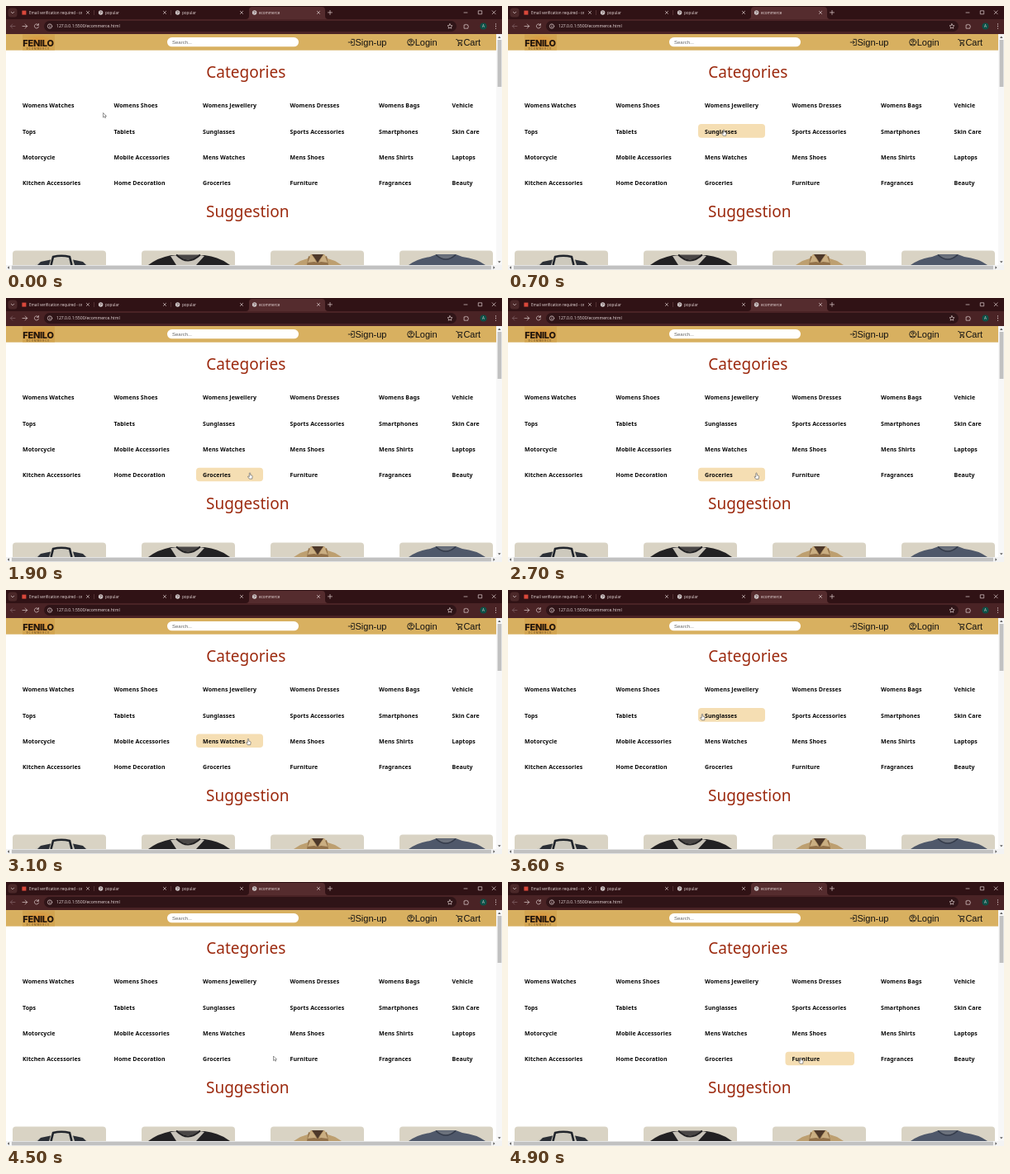
Animation of 600x320 px, one loop 5 s. Source, as an HTML page:

```html
<!DOCTYPE html>
<html lang="en">
<head>
<meta charset="utf-8">
<title>ecommerce</title>
<style>
  html, body { margin: 0; width: 100%; height: 100%; overflow: hidden; background: #fff; }
  svg { display: block; width: 100%; height: 100%; }
  text { white-space: pre; }
  .ui { font-family: "Open Sans", "Noto Sans", sans-serif; font-size: 4.6px; fill: #eadcdc; }
  .link { font: 11px "Liberation Sans", Arial, sans-serif; fill: #111; }
  .title { font: 500 19px "Noto Sans", sans-serif; fill: #9c2a0f; text-anchor: middle; }
  .item { font: 600 7px "Noto Sans", sans-serif; letter-spacing: .07px; fill: #080808; }
  .line { fill: none; stroke: #e0cfcf; stroke-width: .7; stroke-linecap: round; stroke-linejoin: round; }
  .icon { fill: none; stroke: #151515; stroke-width: .85; stroke-linecap: round; stroke-linejoin: round; }
</style>
</head>
<body>
<svg viewBox="0 0 600 320" xmlns="http://www.w3.org/2000/svg">
  <defs>
    <radialGradient id="glow">
      <stop offset="0" stop-color="#dd9136"/>
      <stop offset="1" stop-color="#d2a450"/>
    </radialGradient>
    <clipPath id="page"><rect y="34" width="593" height="280"/></clipPath>
    <clipPath id="tabTitle"><rect x="28" width="64" height="16"/></clipPath>
    <g id="globe">
      <circle r="2.7" fill="#d9d3d3"/>
      <path d="M-1.9-1 L0-1.5 .4 0-.8 .6-.4 1.8M1.2-1.7 1 .2 2 .9" fill="none" stroke="#6a5053" stroke-width=".6"/>
    </g>
  </defs>
  <rect width="600" height="320" fill="#fff"/>

  <!-- browser chrome -->
  <rect width="600" height="34" fill="#301215"/>
  <rect y="16" width="600" height="18" fill="#4a2325"/>
  <path d="M290 16q4 0 4-4V5q0-4 4-4h84q4 0 4 4v7q0 4 4 4z" fill="#552c2e"/>
  <rect x="2.5" y="2.5" width="11" height="11" rx="3.5" fill="#4b2829"/>
  <path class="line" d="M6.3 7.2 8 8.9 9.7 7.2"/>
  <rect x="19.4" y="5.6" width="5" height="5" fill="#d9483b"/>
  <text class="ui" x="28" y="9.8" clip-path="url(#tabTitle)">Email verification required - or</text>
  <g id="tabs"></g>
  <path class="line" d="M392 5.4v5M389.5 7.9h5M554 8h4M571.7 5.8h4v4h-4zM588.2 5.8l4 4M592.2 5.8l-4 4"/>
  <path d="M106.5 5v6M199.5 5v6" stroke="#6a4647" stroke-width=".6"/>
  <rect x="46" y="18" width="499" height="13" rx="6.5" fill="#2f1417"/>
  <path class="line" d="M11 24.5H5.5M7.8 22 5.3 24.5 7.8 27" style="stroke:#86666a"/>
  <path class="line" d="M20 24.5h5.5M23.2 22l2.5 2.5-2.5 2.5"/>
  <path class="line" d="M39.2 23a2.6 2.6 0 1 0 .3 2.2M39.4 21.4v1.9h-1.9"/>
  <circle class="line" cx="53" cy="24.5" r="2.7"/>
  <path class="line" d="M53 24.3v1.5M53 22.9v.1"/>
  <text class="ui" x="61" y="26.4" style="font-size:5.1px">127.0.0.1:5500/ecommerce.html</text>
  <path class="line" d="M537 21.7l.9 1.8 2 .3-1.4 1.4.3 2-1.8-.9-1.8.9.3-2-1.4-1.4 2-.3z"/>
  <path class="line" d="M554.5 22.9h1.4q.4-2 1.5 0h1.4v1.4q2 .6 0 1.5v1.4h-4.3z"/>
  <circle cx="577.5" cy="24.5" r="4" fill="#0d5147"/>
  <text class="ui" x="577.5" y="26.2" text-anchor="middle">A</text>
  <path d="M592.5 21.8v.1M592.5 24.4v.1M592.5 27v.1" stroke="#eadcdc" stroke-width="1.1" stroke-linecap="round"/>

  <g clip-path="url(#page)">
    <!-- header -->
    <rect y="34" width="594" height="19.7" fill="#d8b060"/>
    <rect x="20" y="34.5" width="39" height="19" fill="url(#glow)"/>
    <text x="39" y="48.6" text-anchor="middle" style="font:800 11px Inter,'Open Sans',sans-serif;letter-spacing:-.3px" fill="#21150c">FENILO</text>
    <text x="39" y="52.6" text-anchor="middle" style="font:3px Inter,sans-serif;letter-spacing:1px" fill="#5d4019">ECOMMERCE</text>
    <rect x="195" y="38" width="159" height="11.3" rx="5.6" fill="#fff"/>
    <text x="201" y="45.8" style="font:6px 'Liberation Sans',Arial,sans-serif" fill="#666">Search...</text>
    <path class="icon" d="M418 40.4h3.3v7.2H418M414.2 44h4.8M417.2 42.2l1.8 1.8-1.8 1.8"/>
    <text class="link" x="422.5" y="48">Sign-up</text>
    <g class="icon"><circle cx="489.7" cy="44" r="4"/><circle cx="489.7" cy="42.7" r="1.4"/><path d="M487 47q2.7-2.4 5.4 0"/></g>
    <text class="link" x="494.7" y="48">Login</text>
    <path class="icon" d="M544.6 40.6h1.3l1.9 4h2.8l1.4-3h-5.3M547.8 44.6l-.8 1.4h4.7"/>
    <circle cx="547.3" cy="47.5" r=".85"/><circle cx="551.1" cy="47.5" r=".85"/>
    <text class="link" x="553.4" y="48">Cart</text>

    <!-- content -->
    <text class="title" x="290.3" y="87">Categories</text>
    <rect id="hover" height="16.6" rx="4" fill="#f5deb3"/>
    <g id="items"></g>
    <text class="title" x="292.2" y="255.7">Suggestion</text>
    <g id="cards"></g>
    <g>
      <path d="M35 314l6-4 14-3 3-5h17l4 5 14 3 6 4z" fill="#cdc9bd"/>
      <path d="M38 314l4-4 12-2.500-2 6.500zM97 314l-4-4-12-2.500 2 6.500z" fill="#2b2f36"/>
      <path d="M54.500 314l2.500-10q10-2.500 20 0l2.500 10" fill="none" stroke="#20242b" stroke-width="2.6"/>
    </g>
    <g>
      <path d="M172 314q12-9 28-12h40q18 2 31 12z" fill="#222123"/>
      <path d="M199 303l8-1q13 9 28 0l5 1-10 11h-24z" fill="#c9c4ba"/>
      <path d="M206 301.500h29q-14 12-29 0z" fill="#4a4746"/>
      <path d="M206 301.500q14 14 29 0" fill="none" stroke="#222123" stroke-width="2"/>
    </g>
    <g>
      <path d="M348 314l8-5 9-3 4-5h16l4 5 9 3 8 5z" fill="#bd9f70"/>
      <path d="M366 303l11 7 11-7 2 11h-26z" fill="#92714a"/>
      <path d="M370 301h14l-7 10z" fill="#4d382a"/>
      <path d="M369 301l-4 10 8-1 3 1zM385 301l4 10-8-1-3 1z" fill="#caae82"/>
    </g>
    <g>
      <path d="M487 314q11-8 26-10l8-3h23l8 3q17 2 28 10z" fill="#4f586a"/>
      <path d="M520 301.500q12 11 24 0" fill="#6b717c" stroke="#333a49" stroke-width="1.6"/>
    </g>
  </g>

  <!-- scrollbars -->
  <rect x="593" y="34" width="7" height="286" fill="#f7f7f7"/>
  <rect y="314" width="600" height="6" fill="#f3f3f3"/>
  <rect x="594.6" y="41" width="4.8" height="57" fill="#c1c1c1"/>
  <rect x="7" y="314.7" width="580" height="4.6" fill="#c1c1c1"/>
  <path d="M595 39h3.600l-1.800-2.400zM595 309.200h3.600l-1.800 2.400zM4 315.300v3.600L1.800 317zM589.400 315.300v3.600l2.200-1.900z" fill="#606060"/>

  <path id="arrow" d="M0 0V5.600L1.400 4.400 2.300 6.300 3.200 5.800 2.300 4H4Z" fill="#fff" stroke="#333" stroke-width=".5"/>
  <path id="hand" d="M-.7.6Q-.6-.2 0-.2T.7.6V2.700L2.500 3.100Q3.200 3.300 3.100 4.200L2.700 7.200H-.7L-2.400 4.700Q-2.500 3.900-1.700 4L-.7 4.800Z" fill="#fff" stroke="#333" stroke-width=".5"/>
</svg>
<script>
const $ = id => document.getElementById(id);
const LOOP = 5000, STEP = 100;

// left edge of the text, width of the hover box, labels from top to bottom
const columns = [
  [20, 86, ["Womens Watches", "Tops", "Motorcycle", "Kitchen Accessories"]],
  [130.5, 83, ["Womens Shoes", "Tablets", "Mobile Accessories", "Home Decoration"]],
  [238, 81, ["Womens Jewellery", "Sunglasses", "Mens Watches", "Groceries"]],
  [343.5, 83.5, ["Womens Dresses", "Sports Accessories", "Mens Shoes", "Furniture"]],
  [451, 64, ["Womens Bags", "Smartphones", "Mens Shirts", "Fragrances"]],
  [539.5, 51, ["Vehicle", "Skin Care", "Laptops", "Beauty"]]
];
const rowTop = row => 111.8 + row * 31.3;

const boxes = columns.flatMap(([x, w, labels]) =>
  labels.map((label, row) => ({ x: x - 8, y: rowTop(row), w, label })));

$("items").innerHTML = boxes.map(b =>
  `<text class="item" x="${b.x + 8}" y="${b.y + 11.4}">${b.label}</text>`).join("");

$("cards").innerHTML = [0, 1, 2, 3].map(i =>
  `<rect x="${8 + i * 156}" y="296.5" width="113" height="30" rx="4" fill="#d9d3c4"/>`).join("");

$("tabs").innerHTML = ["", "popular", "popular", "ecommerce"].map((name, i) => {
  const x = 21.6 + i * 93;
  const icon = name && `<use href="#globe" x="${x}" y="8"/><text class="ui" x="${x + 5.4}" y="9.8">${name}</text>`;
  return icon + `<path class="line" d="M${x + 75.8} 6.3l3.2 3.2m0-3.2l-3.2 3.2"/>`;
}).join("");

// pointer tip: time, x, y
const path = [
  [0, 117.5, 129.5], [300, 164, 149], [700, 261, 150],
  [1000, 296, 153], [1300, 301, 183], [1600, 299, 207], [1900, 295, 212],
  [2600, 295, 212], [2800, 306, 212.5], [2900, 306, 212.5],
  [3100, 293, 180.5], [3600, 235, 150.5], [4000, 249, 185],
  [4300, 277, 210], [4700, 370, 212], [4900, 354, 213], [5000, 354, 213]
];

function tipAt(t) {
  const i = path.findIndex(p => p[0] > t);
  const [t0, x0, y0] = path[i - 1], [t1, x1, y1] = path[i];
  const k = (t - t0) / (t1 - t0);
  return [x0 + (x1 - x0) * k, y0 + (y1 - y0) * k];
}

function draw(time) {
  const t = Math.floor(time % LOOP / STEP) * STEP;
  const [x, y] = tipAt(t);
  const over = boxes.find(b => x >= b.x && x <= b.x + b.w && y >= b.y && y <= b.y + 16.6);
  const show = (el, on) => el.setAttribute("visibility", on ? "visible" : "hidden");
  const hover = $("hover");
  show(hover, over);
  if (over) {
    hover.setAttribute("x", over.x);
    hover.setAttribute("y", over.y);
    hover.setAttribute("width", over.w);
  }
  for (const id of ["arrow", "hand"]) {
    $(id).setAttribute("transform", `translate(${x} ${y})`);
    show($(id), (id === "hand") === Boolean(over));
  }
}

const start = performance.now();
function tick() {
  draw(performance.now() - start);
  requestAnimationFrame(tick);
}
tick();
</script>
</body>
</html>
```
